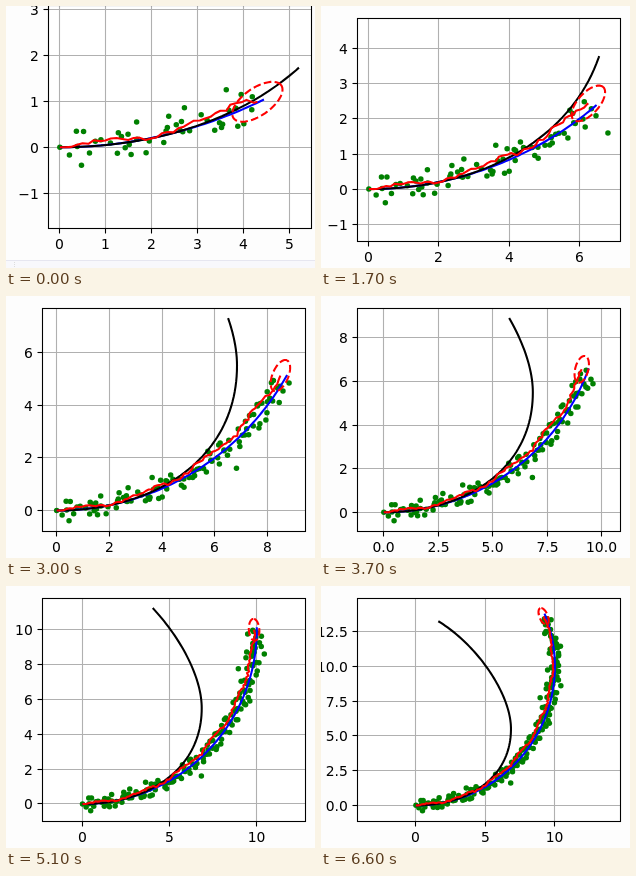
An HTML page with a canvas for the animation above (6.7 s loop, 309x262 px).

```html
<!DOCTYPE html>
<html lang="en">
<head>
<meta charset="utf-8">
<title>Position tracking plot</title>
<style>
html, body { margin: 0; width: 309px; height: 262px; overflow: hidden; background: #fdfdfd; }
canvas { display: block; }
</style>
</head>
<body>
<canvas id="plot" width="309" height="262"></canvas>
<script>
const ctx = document.getElementById('plot').getContext('2d');
const LOOP = 6700, STEP = 100;
const RADIUS = 10, LAG = .15, TRAVEL = 19.6;
const BOX = { left: 36.5, right: 299.5, top: 12.5, bottom: 235.5 };
const WIDTH = BOX.right - BOX.left, HEIGHT = BOX.bottom - BOX.top;

// Key poses: tick, distance travelled, progress along the drift curve
const PACE = [
  [8, 4.6, .55], [9, 4.83, .583], [24, 9.03, 1.035], [36, 12.24, 1.412],
  [44, 14.3, 1.537], [56, 17.4, 1.85], [65, TRAVEL, 2]
];

// Dead reckoning as two joined cubic curves
const DRIFT = [
  [[0, 0], [3.8, 0], [6.84, 2], [6.84, 5.5]],
  [[6.84, 5.5], [6.84, 8], [4.43, 11.53], [1.61, 13.25]]
];

// The few readings that stand apart from the cloud
const STRAYS = [
  [0, 0], [.47, -.39], [1.55, -.16], [2.71, .86], [3.62, 1.25], [4.83, .88], [6.82, 1.6],
  [7.6, 4.02], [9.6, 5.9], [9.3, 7.1], [8.94, 7.75], [10.43, 8.6], [10.4, 11.45]
];

function random(seed) {
  return () => (seed = (seed * 16807) % 2147483647) / 2147483647;
}

function onArc(s, inset = 0) {
  const r = RADIUS - inset;
  return [r * Math.sin(s / RADIUS), RADIUS - r * Math.cos(s / RADIUS)];
}

function arcOf([x, y]) {
  return RADIUS * Math.atan2(x, RADIUS - y);
}

function makeDots() {
  const rnd = random(4711);
  const dots = STRAYS.map(p => ({ p, s: arcOf(p) }));
  for (let s = .5; s < TRAVEL; s += .105) {
    const inset = Math.max(-.3, (rnd() + rnd() - 1) * .6);
    dots.push({ p: onArc(s - rnd() * .45, inset), s });
  }
  return dots;
}
const DOTS = makeDots();

const rnd = random(90210);
const JITTER = Array.from({ length: 200 }, () => (rnd() - .5) * .12);

function paceAt(frame) {
  const tick = Math.max(PACE[0][0], frame > 34 ? frame - 1 : frame);   // one stalled frame
  const i = Math.max(1, PACE.findIndex(k => tick <= k[0]));
  const a = PACE[i - 1], b = PACE[i], u = (tick - a[0]) / (b[0] - a[0]);
  return [1, 2].map(k => a[k] + (b[k] - a[k]) * u);
}

function driftAt(t) {
  const part = t < 1 ? 0 : 1, u = t - part, v = 1 - u;
  const [a, b, c, d] = DRIFT[part];
  return [0, 1].map(k => v * v * v * a[k] + 3 * v * v * u * b[k] + 3 * v * u * u * c[k] + u * u * u * d[k]);
}

// The estimate runs inside the arc, swaying and jittering
function estimateAt(s) {
  const bulge = .05 + .2 * Math.sin(Math.PI * s / 22) ** 2;
  const sway = .07 * Math.cos(2.37 * (s - 3.5));
  return onArc(s, (bulge + sway + JITTER[Math.floor(s * 8)]) * Math.min(1, s));
}

function trace(path, end, step) {
  const pts = [];
  for (let s = 0; s < end; s += step) pts.push(path(s));
  pts.push(path(end));
  return pts;
}

function ellipseAt(s, [cx, cy]) {
  const a = .63, b = .3;
  const tilt = s / RADIUS + .15 * (1 - (s / 20) ** 2);
  const c = Math.cos(tilt), n = Math.sin(tilt);
  return trace(k => {
    const u = a * Math.cos(k), v = b * Math.sin(k);
    return [cx + u * c - v * n, cy + u * n + v * c];
  }, 2 * Math.PI, .1);
}

// Equal scale on both axes with a 5% margin
function fit(points) {
  const span = k => {
    const vals = points.map(p => p[k]), lo = Math.min(...vals), hi = Math.max(...vals);
    return { mid: (lo + hi) / 2, size: (hi - lo) * 1.1 };
  };
  const x = span(0), y = span(1);
  const scale = Math.min(WIDTH / x.size, HEIGHT / y.size);
  const midX = (BOX.left + BOX.right) / 2 - .6, midY = (BOX.top + BOX.bottom) / 2 - .6;
  return {
    px: v => midX + (v - x.mid) * scale,
    py: v => midY - (v - y.mid) * scale,
    xTicks: ticks(x.mid, WIDTH / scale, 6),
    yTicks: ticks(y.mid, HEIGHT / scale, 8)
  };
}

function ticks(mid, range, bins) {
  const step = [.5, 1, 2, 2.5, 5, 10].find(v => v >= range / bins);
  const list = [];
  for (let k = Math.ceil((mid - range / 2) / step); k * step <= mid + range / 2; k++) {
    const v = k * step;
    list.push({ v, label: v.toFixed(step % 1 ? 1 : 0).replace('-', '\u2212') });
  }
  return list;
}

function line(pts, color, width, dash = []) {
  ctx.beginPath();
  pts.forEach(([x, y]) => ctx.lineTo(x, y));
  ctx.strokeStyle = color;
  ctx.lineWidth = width;
  ctx.setLineDash(dash);
  ctx.stroke();
}

const snap = v => Math.floor(v) + .5;

function drawAxes(view) {
  ctx.font = '13.9px "DejaVu Sans", sans-serif';
  ctx.fillStyle = '#000';
  ctx.textAlign = 'center';
  for (const { v, label } of view.xTicks) {
    const x = snap(view.px(v));
    line([[x, BOX.top], [x, BOX.bottom]], '#b0b0b0', 1.1);
    line([[x, BOX.bottom], [x, BOX.bottom + 5]], '#000', 1.1);
    ctx.fillText(label, x, BOX.bottom + 20);
  }
  ctx.textAlign = 'right';
  for (const { v, label } of view.yTicks) {
    const y = snap(view.py(v));
    line([[BOX.left, y], [BOX.right, y]], '#b0b0b0', 1.1);
    line([[BOX.left - 5, y], [BOX.left, y]], '#000', 1.1);
    ctx.fillText(label, BOX.left - 9.7, y + 5.1);
  }
}

function drawWindowEdge() {
  ctx.fillStyle = '#f8f8fc';
  ctx.fillRect(-10, 267, 330, 20);
  ctx.fillStyle = '#e6e6f0';
  ctx.fillRect(-10, 267, 330, 1);
  line([[2.5, 269], [2.5, 280]], '#dddddd', 1, [1, 1]);
}

function draw(frame) {
  const [s, progress] = paceAt(frame);
  const seen = s - LAG;
  const truth = trace(onArc, s, .1);
  const drift = trace(driftAt, progress, .02);
  const estimate = trace(estimateAt, seen, .125);
  const ring = ellipseAt(s, estimateAt(seen));
  const dots = DOTS.filter(d => d.s <= s + .05).map(d => d.p);
  const view = fit([...truth, ...drift, ...estimate, ...ring, ...dots]);
  const toPx = pts => pts.map(([x, y]) => [view.px(x), view.py(y)]);

  // The window slides into place during the first frames
  const slide = Math.max(0, 1 - frame / 3);
  ctx.setTransform(1, 0, 0, 1, 0, 0);
  ctx.fillStyle = '#fdfdfd';
  ctx.fillRect(0, 0, 309, 262);
  ctx.translate(Math.round(6 * slide), Math.round(-13 * slide));
  drawWindowEdge();
  ctx.fillStyle = '#fff';
  ctx.fillRect(BOX.left, BOX.top, WIDTH, HEIGHT);
  drawAxes(view);

  ctx.save();
  ctx.beginPath();
  ctx.rect(BOX.left, BOX.top, WIDTH, HEIGHT);
  ctx.clip();
  ctx.lineJoin = 'round';
  ctx.fillStyle = '#008000';
  for (const [x, y] of toPx(dots)) {
    ctx.beginPath();
    ctx.arc(x, y, 2.75, 0, 7);
    ctx.fill();
  }
  line(toPx(truth), '#0000ff', 2.08);
  line(toPx(drift), '#000', 2.08);
  line(toPx(estimate), '#ff0000', 2.08);
  line(toPx(ring), '#ff0000', 2.08, [7.7, 3.3]);
  ctx.restore();

  ctx.setLineDash([]);
  ctx.strokeStyle = '#000';
  ctx.lineWidth = 1.1;
  ctx.strokeRect(BOX.left, BOX.top, WIDTH, HEIGHT);
}

let shown = -1;
function tick() {
  const frame = Math.floor(performance.now() % LOOP / STEP);
  if (frame !== shown) draw(shown = frame);
  requestAnimationFrame(tick);
}
tick();
</script>
</body>
</html>
```
